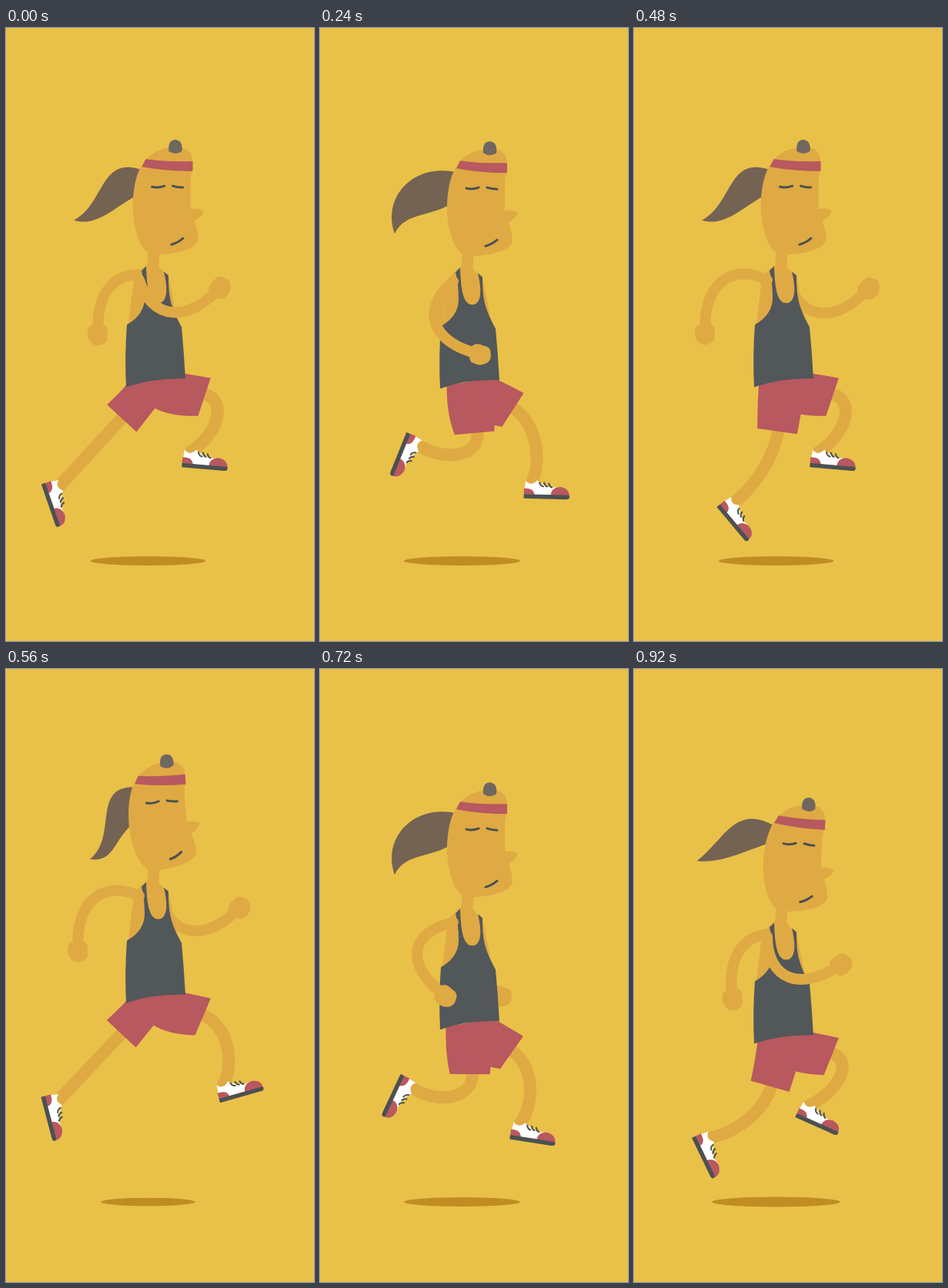
An HTML page that plays this animation: 400x796 px, repeating every 0.96 s.

```html
<!DOCTYPE html>
<html lang="en">
<head>
<meta charset="utf-8">
<title>Runner</title>
<style>
  html, body { margin: 0; width: 100%; height: 100%; overflow: hidden; background: #e9c148; }
  svg { display: block; width: 100%; height: 100%; }
  .skin { fill: #dfaa44; }
  .limb { fill: none; stroke: #dfaa44; stroke-linecap: round; }
  .red { fill: #b8585f; }
  .dark { fill: #525759; }
  .line { fill: none; stroke: #4b5053; stroke-linecap: round; }
  .hair { fill: #746253; }
</style>
</head>
<body>
<svg viewBox="0 0 400 796">
  <defs>
    <g id="shoe">
      <path fill="#fff" d="M-10 16L-8 -2Q-1 6 7 -3C13 3 22 5 28 6C38 4 48 9 49 16Z"/>
      <path class="red" d="M-10 16V8Q3 7 4 16ZM25 16C25 8 32 5 37 5C45 6 49 10 49 16Z"/>
      <path fill="#4b5053" d="M-10 15.500H49Q51 21 45 21H-10Z"/>
      <path class="line" stroke-width="2" d="M10 0Q11 4 15 5M16 0Q17 4 20 5M22 1Q23 5 26 6"/>
    </g>
    <path id="fist" class="skin" d="M-12 -8Q-8 -14 2 -12Q12 -13 14 -4Q17 3 12 9Q4 16 -6 13Q-14 12 -12 -8Z"/>
  </defs>
  <ellipse id="shadow" cx="184.5" cy="692" fill="#c08d23"/>
  <g id="runner">
    <path id="farArm" class="limb" stroke-width="14"/>
    <use id="farFist" href="#fist"/>
    <path id="farLeg" class="limb" stroke-width="16"/>
    <use id="farShoe" href="#shoe"/>
    <path id="farShorts" class="red"/>
    <path id="nearLeg" class="limb" stroke-width="16"/>
    <use id="nearShoe" href="#shoe"/>
    <path id="nearShorts" class="red"/>
    <path id="tail" class="hair"/>
    <g transform="translate(0 -466)">
      <path class="skin" d="M182 308L197 306Q200 314 211 321L223 382L230 400H157L166 326Q172 315 182 308Z"/>
      <path class="limb" stroke-width="15" d="M193 285L189 325"/>
      <path class="dark" d="M182 309C183 345 188 357 198 357C209 357 211 340 205 316L211 321C211 350 214 362 228 388Q231 420 233 455Q190 454 156 466Q154 425 157 385Q180 372 180 350Q180 330 176 315Z"/>
      <g id="head">
        <path class="skin" d="M185 292C172 283 165 255 165 232C166 195 174 157 220 154.500C236 154 243 162 243 174C243 184 240 190 240 204V235Q252 233 257 238Q254 246 245 250Q249 262 250 273C250 286 224 293 200 294Q190 294 185 292Z"/>
        <path fill="#6f6760" d="M212 160C211 150 214 145 221 145C229 146 230 154 229 160Q221 166 212 160Z"/>
        <path class="red" d="M182 170Q210 174 243 173V186Q208 186 177 180Z"/>
        <path class="line" stroke-width="3" d="M190 206Q198 208 206 205M217 205Q223 207 230 207M215 281Q223 279 230 273"/>
      </g>
    </g>
    <path id="nearArm" class="limb" stroke-width="14"/>
    <use id="nearFist" href="#fist"/>
  </g>
</svg>
<script>
const LOOP = 960, STRIDE = LOOP / 2, STEP = 40;
const GROUND = 638, HIP = [195, -8];
const el = {};
document.querySelectorAll('[id]').forEach(e => el[e.id] = e);

const RAD = Math.PI / 180;
const wave = (t, period) => Math.cos(2 * Math.PI * t / period);
const mod = (t, n) => (t % n + n) % n;
const clamp = (v, lo, hi) => Math.min(hi, Math.max(lo, v));
const polar = ([x, y], r, deg) => [x + r * Math.cos(deg * RAD), y + r * Math.sin(deg * RAD)];
const mix = (a, b, k) => a.map((v, i) => v + (b[i] - v) * k);
const place = (e, [x, y], a) => e.setAttribute('transform', `translate(${x} ${y}) rotate(${a})`);
const draw = (e, d) => e.setAttribute('d', d);

// One step of a foot: time, x, y below the waist, angle. Both feet use it.
const step = [
  [0, 69, 129, 71], [120, 82, 98, 108], [240, 128, 74, 112], [400, 213, 80, 46],
  [480, 240, 84, 5], [640, 313, 128, -25], [705, 272, 122, 3], [840, 150, 140, 53],
  [885, 130, 150, 50], [925, 94, 120, 66]
];

// Smooth periodic curve through key points.
function sample(rows, t) {
  const n = rows.length;
  const key = i => rows[mod(i, n)];
  const time = i => key(i)[0] + Math.floor(i / n) * LOOP;
  let i = n - 1;
  while (rows[i][0] > t) i--;
  const t0 = time(i), t1 = time(i + 1), h = t1 - t0, u = (t - t0) / h;
  const a = key(i - 1), b = key(i), c = key(i + 1), d = key(i + 2);
  const s0 = h / (t1 - time(i - 1)), s1 = h / (time(i + 2) - t0);
  const u2 = u * u, u3 = u2 * u;
  return b.slice(1).map((p, j) => {
    const q = c[j + 1];
    const m0 = (q - a[j + 1]) * s0, m1 = (d[j + 1] - p) * s1;
    return (2 * u3 - 3 * u2 + 1) * p + (u3 - 2 * u2 + u) * m0 + (3 * u2 - 2 * u3) * q + (u3 - u2) * m1;
  });
}

// Bounce: eased fall from the apex to the landing and back up.
function height(t) {
  const fall = Math.abs(1 - mod(t - 358, STRIDE) / (STRIDE / 2));
  return 425 + 109 * fall ** 1.37;
}

// How far a two-part limb bends sideways when its ends are d apart.
const bend = (len, d) => Math.sqrt(Math.max(0, len * len - d * d / 4));

function drawLeg(side, t, y) {
  const [x, drop, angle] = sample(step, mod(t, LOOP));
  const foot = [x, Math.min(drop, GROUND - y)];
  const dx = foot[0] - HIP[0], dy = foot[1] - HIP[1], d = Math.hypot(dx, dy);
  const h = bend(90, d), flex = h / 90;
  const knee = [HIP[0] + dx / 2 + dy / d * h, HIP[1] + dy / 2 - dx / d * h];
  const thigh = Math.atan2(knee[1] - HIP[1], knee[0] - HIP[0]) / RAD + 12 * flex;

  const start = polar(HIP, 50, thigh);
  const c1 = mix(start, knee, 1.15);
  const shin = mix(foot, knee, 0.4);
  const c2 = shin.map((v, i) => v + (knee[i] - HIP[i]) * flex * 0.33);
  draw(el[side + 'Leg'], `M${start}C${c1} ${c2} ${foot}`);
  place(el[side + 'Shoe'], foot, angle);

  const hem = polar(HIP, 66, thigh);
  const rear = polar(hem, 26, thigh + 90), front = polar(hem, 26, thigh - 90);
  const waist = [clamp(157 + (rear[0] - 130) * 0.17, 155, 167), -4];
  const k = (rear[0] - 156) / 100, [mx, my] = mix(waist, rear, 0.5);
  const top = -14 - clamp((-5 - front[1]) * 0.65, 0, 12);
  draw(el[side + 'Shorts'],
    `M${waist}Q${mx - 30 * k} ${my + 24 * k} ${rear}L${front}L226 ${top}Z`);
}

function drawArm(side, t, shoulder) {
  const c = wave(t - 36, LOOP);
  const dx = 12 + 95 * c, dy = 95 - 62 * c ** 4 - 32 * c ** 3, d = Math.hypot(dx, dy);
  const h = 1.25 * bend(66, d) / d;
  const at = (k, out) => [shoulder[0] + dx * k - dy * out, shoulder[1] + dy * k + dx * out];
  const c1 = at(0.2, h), c2 = at(0.65, h), hand = at(1, 0);
  draw(el[side + 'Arm'], `M${shoulder}C${c1} ${c2} ${hand}`);
  place(el[side + 'Fist'], hand, Math.atan2(hand[1] - c2[1], hand[0] - c2[0]) / RAD);
}

// The ponytail trails the bounce and curls on a wave of its own.
function drawTail(t, tilt) {
  const sag = 55 - 0.62 * (height(t - 20) - 426);
  const curl = -40 + 50 * wave(t - 60, STRIDE) - sag;
  const top = [182 + 2 * tilt, -280], low = [174 + 2 * tilt, -270 + 0.8 * sag];
  const tip = polar([175, -255], 95, 180 - sag);
  const out = [polar(top, 65, 220 - 0.75 * sag), polar(tip, 48, curl), tip];
  const back = [polar(tip, 32, curl + 45), polar(low, 36, 170 - 0.7 * sag), low];
  draw(el.tail, `M${top}C${out.join(' ')}C${back.join(' ')}Z`);
}

function render(t) {
  const y = height(t), tilt = 0.135 * (y - 468);
  const rx = Math.min(91.5, 75.5 + 0.42 * (y - 468));
  el.shadow.setAttribute('rx', rx);
  el.shadow.setAttribute('ry', 2 + rx * 0.054);
  place(el.runner, [0, y], 0);
  el.head.setAttribute('transform', `rotate(${tilt} 190 300)`);

  const late = 75 * ((1 - wave(t, LOOP)) / 2) ** 2;
  drawLeg('far', t + STRIDE - late, y);
  drawLeg('near', t, y);
  drawArm('far', t + STRIDE, [200, -138]);
  drawArm('near', t, [173, -139]);
  drawTail(t, tilt);
}

const begin = performance.now();
function tick() {
  const t = (performance.now() - begin) % LOOP;
  render(Math.floor(t / STEP) * STEP);
  requestAnimationFrame(tick);
}
tick();
</script>
</body>
</html>
```
